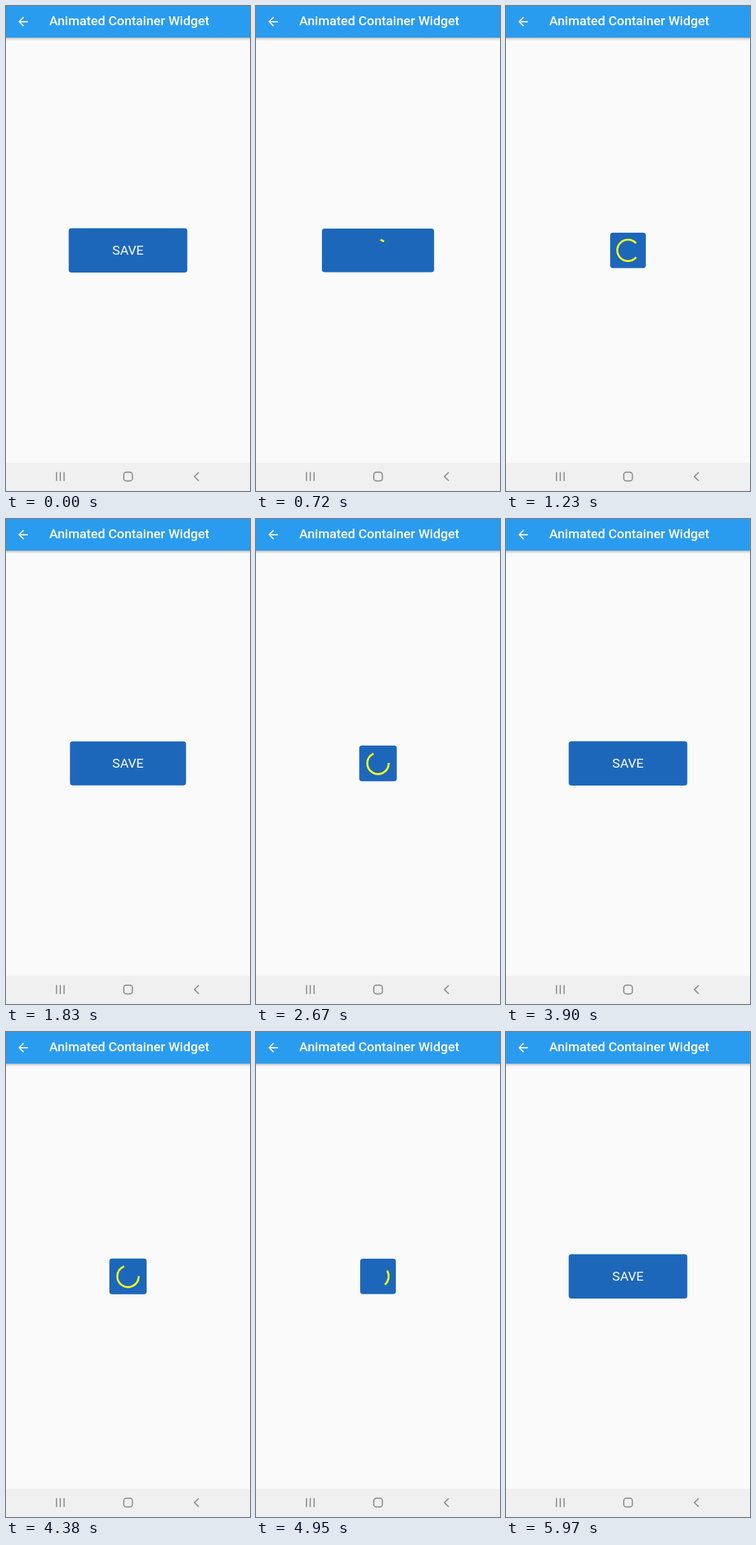
Recreate the animation shown at these times as an HTML page. Size 356x706 px, loop 6 s.

```html
<!DOCTYPE html>
<html lang="en">
<head>
<meta charset="utf-8">
<title>Animated Container Widget</title>
<style>
  html, body { margin: 0; width: 100%; height: 100%; overflow: hidden; background: #fafafa; }
  svg { display: block; width: 100%; height: 100%; }
  text { font: 19px Roboto, Arial, sans-serif; fill: #fff; }
  .title { font-weight: 500; }
  .nav { fill: none; stroke: #8b8b8b; stroke-width: 1.7; }
  #spinner { fill: none; stroke: #ffff1c; stroke-width: 2.8; stroke-linecap: square; }
</style>
</head>
<body>
<svg viewBox="0 0 356 706">
  <defs>
    <linearGradient id="shade" x2="0" y2="1">
      <stop offset="0" stop-color="#000" stop-opacity=".27"/>
      <stop offset=".4" stop-color="#000" stop-opacity=".1"/>
      <stop offset="1" stop-color="#000" stop-opacity="0"/>
    </linearGradient>
  </defs>
  <rect width="356" height="706" fill="#fafafa"/>

  <rect y="46" width="356" height="5" fill="url(#shade)"/>
  <rect width="356" height="46" fill="#2a9cef"/>
  <path transform="translate(14.6 12.4) scale(.866)" fill="#fff"
        d="M20 11H7.83l5.59-5.59L12 4l-8 8 8 8 1.41-1.41L7.83 13H20z"/>
  <text class="title" x="63" y="28.2">Animated Container Widget</text>

  <rect id="box" rx="4" fill="#1d67ba"/>
  <text id="label" x="178" y="362.2" text-anchor="middle">SAVE</text>
  <path id="spinner"/>

  <rect y="665" width="356" height="41" fill="#f0f0f0"/>
  <g class="nav">
    <path d="M73.7 678.5v13M79.2 678.5v13M84.7 678.5v13"/>
    <rect x="171.8" y="678.7" width="12.6" height="12.6" rx="3.6"/>
    <path d="M281.2 678.8l-6.3 6.2 6.3 6.2"/>
  </g>
</svg>
<script>
const LOOP = 6000, STEP = 30, RESIZE = 500;
// Each tap toggles the button between its label and its spinner
const TAPS = [640, 1440, 2267, 3160, 3970, 4985];
const CX = 178, CY = 355.7, RADIUS = 15.6;
const WIDE = [173, 64.4], SMALL = [52, 51.6];

const box = document.getElementById('box');
const label = document.getElementById('label');
const spinner = document.getElementById('spinner');

const clamp = v => Math.min(1, Math.max(0, v));
const mix = (a, b, k) => a + (b - a) * k;

// cubic-bezier(.4, 0, .2, 1)
function ease(v) {
  const x = clamp(v);
  let lo = 0, hi = 1;
  for (let i = 0; i < 24; i++) {
    const s = (lo + hi) / 2, r = 1 - s;
    if (1.2 * r * r * s + 0.6 * r * s * s + s ** 3 < x) lo = s; else hi = s;
  }
  return lo * lo * (3 - 2 * lo);
}

function drawBox(k) {
  const w = mix(WIDE[0], SMALL[0], k), h = mix(WIDE[1], SMALL[1], k);
  const attrs = { x: CX - w / 2, y: CY - h / 2, width: w, height: h };
  for (const name in attrs) box.setAttribute(name, attrs[name]);
}

function point(deg) {
  const a = deg * Math.PI / 180;
  return `${CX + RADIUS * Math.cos(a)} ${CY + RADIUS * Math.sin(a)}`;
}

// Indeterminate arc: the head runs ahead, then the tail catches up
function drawSpinner(time) {
  const phase = time / 1333 % 1;
  const head = ease(phase * 2), tail = ease(phase * 2 - 1);
  const start = -90 + 270 * tail + 360 * time / 2222 + 90 * phase;
  const sweep = Math.max(270 * (head - tail), 0.1);
  spinner.setAttribute('d',
    `M${point(start)}A${RADIUS} ${RADIUS} 0 ${+(sweep > 180)} 1 ${point(start + sweep)}`);
}

function render(ms) {
  const now = Math.floor(ms % LOOP / STEP) * STEP;
  const past = TAPS.filter(t => t <= now);
  const since = past.length ? now - past[past.length - 1] : Infinity;
  const loading = past.length % 2 === 1;
  const moved = ease(since / RESIZE);
  drawBox(loading ? moved : 1 - moved);
  label.style.display = loading ? 'none' : '';
  spinner.style.display = loading ? '' : 'none';
  if (loading) drawSpinner(since);
}

const origin = performance.now();
function tick() {
  render(performance.now() - origin);
  requestAnimationFrame(tick);
}
tick();
</script>
</body>
</html>
```
